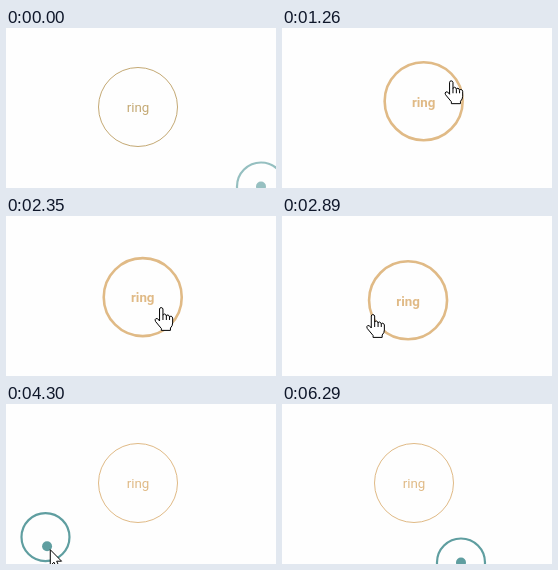
Animation, 270 px wide and 160 px high, one loop 6.4 s. Source, as an HTML page:

```html
<!DOCTYPE html>
<html lang="en">
<head>
<meta charset="utf-8">
<title>Magnetic ring button</title>
<style>
  html, body { margin: 0; width: 100%; height: 100%; overflow: hidden; background: #fefefe; }
  svg { display: block; }
  text { font: 13.33px Roboto, Arial, sans-serif; text-anchor: middle; }
</style>
</head>
<body>
<svg width="270" height="160" viewBox="0 0 270 160">
  <g id="button">
    <circle id="edge" fill="none"/>
    <text id="label" y="5.3">ring</text>
  </g>
  <circle id="halo" r="24" fill="none" stroke="cadetblue" stroke-width="2.2"/>
  <circle id="dot" r="5" fill="cadetblue"/>
  <g id="cursor" fill="#fff" stroke="#000" stroke-linejoin="round">
    <path id="arrow" d="M.5 .5V16.5L4.2 13L7 19.2L9.6 18L6.9 12H11.8Z"/>
    <path id="hand" d="M-1.6 14V2Q-1.4 .6 0 .6T1.8 2V8.5Q2 7 3.4 7T5.2 9Q5.6 7.8 6.8 8T8.4 10Q9 9 10 9.2T11.5 11V16Q11.5 19 9.3 21V23.4H.2V21.5L-5.6 14.5Q-6.8 12.5-5.2 11.6T-1.6 14ZM1.8 8.5V13M5.2 9V13M8.4 10V13"/>
  </g>
</svg>
<script>
const LOOP = 6400, SHOW = 70, ENTER = 960, LEAVE = 2950, HIDE = 6000;
const DOT_LAG = 60, LAG = 165, PULL = .3, REST = [132, 79];
const el = id => document.getElementById(id);
const clamp = v => Math.max(0, Math.min(1, v));
const isHover = t => t >= ENTER && t < LEAVE;

// Turning points of the pointer: time, x, y
const turns = [
  [0, 255, 158.5], [600, 223, 94], [740, 190, 70], [800, 189, 70], [1000, 171, 62],
  [1400, 168, 50], [1750, 150, 66], [2000, 126, 80], [2300, 156, 90], [2890, 91, 98],
  [3350, 18, 68], [3450, 28, 27], [3550, 47, 38], [3630, 45, 61], [4050, 36, 130],
  [4400, 50, 147], [4720, 128, 143], [4890, 172, 150], [5800, 179, 158.5]
];

// Tangent that never overshoots the neighbouring points
function tangent(i, axis) {
  if (!i || i === turns.length - 1) return 0;
  const [a, b, c] = turns.slice(i - 1, i + 2);
  const before = (b[axis] - a[axis]) / (b[0] - a[0]);
  const after = (c[axis] - b[axis]) / (c[0] - b[0]);
  return before * after > 0 ? 2 * before * after / (before + after) : 0;
}

function pointer(t) {
  const next = turns.findIndex(p => p[0] > t);
  if (next < 1) return turns.at(next && -1).slice(1);
  const a = turns[next - 1], b = turns[next], span = b[0] - a[0], u = (t - a[0]) / span;
  const ease = u * u * (3 - 2 * u);
  return [1, 2].map(k => a[k] + (b[k] - a[k]) * ease + span * u * (1 - u) *
    ((1 - u) * tangent(next - 1, k) - u * tangent(next, k)));
}

// Exponential smoothing of a path, as a mean over equally likely delays
function follow(path, t, lag, samples = 40) {
  const sum = [0, 0];
  for (let i = 0; i < samples; i++) {
    const p = path(t + lag * Math.log((i + .5) / samples));
    sum[0] += p[0] / samples;
    sum[1] += p[1] / samples;
  }
  return sum;
}

const magnet = t => isHover(t)
  ? pointer(t).map((v, k) => REST[k] + PULL * (v - REST[k]))
  : REST;

const move = (id, p) => el(id).setAttribute("transform", `translate(${p})`);
const show = (id, on) => el(id).style.display = on ? "" : "none";

function draw(now) {
  const t = now % LOOP, hover = isHover(t);
  const thick = clamp((t - ENTER) / 200) - clamp((t - LEAVE) / 200);
  const color = t < ENTER ? "#c4a974" : "#e0ba86";

  move("button", follow(magnet, t, LAG));
  el("edge").setAttribute("r", 39.5 - thick / 2);
  el("edge").setAttribute("stroke-width", 1 + 1.6 * thick);
  el("edge").setAttribute("stroke", color);
  el("label").setAttribute("fill", color);
  el("label").style.fontWeight = hover ? 700 : 400;

  move("halo", follow(pointer, t, LAG));
  move("dot", follow(pointer, t, DOT_LAG));
  const fade = Math.min(clamp(.65 + t / 3500), 1 - clamp((t - ENTER) / 150) + clamp((t - LEAVE) / 150));
  for (const id of ["halo", "dot"]) el(id).style.opacity = fade;

  move("cursor", pointer(t));
  show("cursor", t >= SHOW && t < HIDE);
  show("arrow", !hover);
  show("hand", hover);
}

const start = performance.now();
function tick() {
  draw(performance.now() - start);
  requestAnimationFrame(tick);
}
tick();
</script>
</body>
</html>
```
